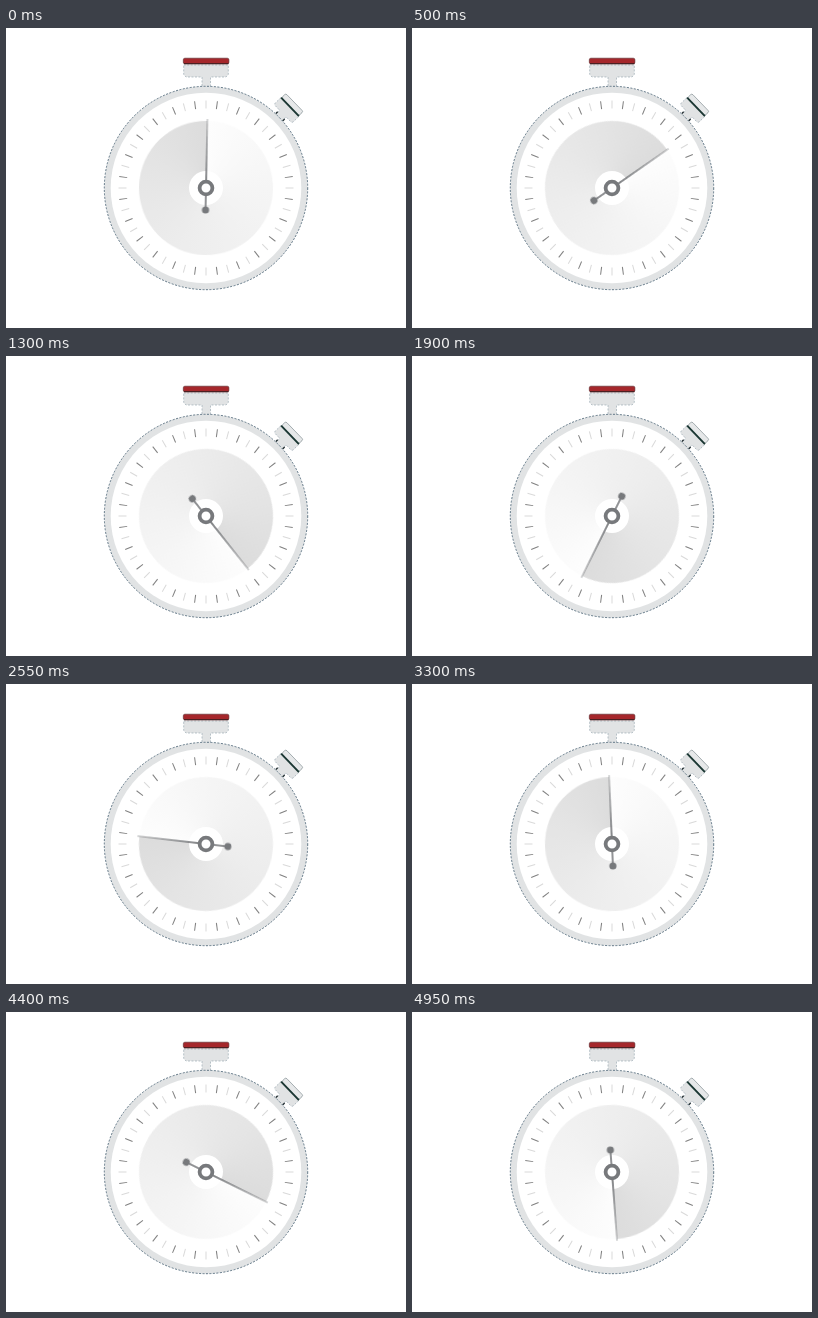
An HTML page that plays this animation: 400 px wide and 300 px high, repeating every 5 s.

```html
<!DOCTYPE html>
<html lang="en">
<head>
<meta charset="utf-8">
<title>Stopwatch</title>
<style>
  html, body { margin: 0; width: 100%; height: 100%; overflow: hidden; background: #fff; }
  svg, .sweep { position: absolute; }
  svg { left: 0; top: 0; }
  .sweep {
    left: 133px; top: 93px; width: 134px; height: 134px; border-radius: 50%;
    background: conic-gradient(#fdfdfd, #f5f5f5 25%, #ededed 55%, #e4e4e4 82%, #dcdcdc);
  }
  #hand { transform-origin: 0 0; }
</style>
</head>
<body>
<svg width="400" height="300" viewBox="0 0 400 300">
  <g fill="#e1e3e4" stroke="#8fa0aa" stroke-width=".6" stroke-dasharray="2 1.5">
    <path d="M177.7 37H222.3V46.5L220 49H204.5V60H196V49H180L177.7 46.5Z"/>
    <g transform="translate(200 160) rotate(46)">
      <path d="M-4.5 -101V-107H-11Q-13 -107 -13 -109V-116.5H13V-109Q13 -107 11 -107H4.5V-101Z"/>
    </g>
    <circle cx="200" cy="160" r="101.7" stroke="#3f5a6c" stroke-width=".8"/>
  </g>
  <rect x="177.3" y="30.2" width="45.6" height="5.6" rx="1.6" fill="#a5272b" stroke="#57272a" stroke-width=".6"/>
  <path d="M178 35.6H222.5" stroke="#4a2022" stroke-width="1.1"/>
  <g transform="translate(200 160) rotate(46)">
    <rect x="-12.5" y="-123" width="25" height="6" rx="1.6" fill="#e6e8e9" stroke="#5d6d72" stroke-width=".5"/>
    <path d="M-12.8 -116.8H12.8" stroke="#1b3733" stroke-width="1.9"/>
    <path d="M-5 -104.5V-102M5 -104.5V-102" stroke="#222d30" stroke-width="1.4"/>
  </g>
  <circle cx="200" cy="160" r="95.3" fill="#fff"/>
  <g id="ticks" transform="translate(200 160)"></g>
</svg>
<div class="sweep" id="sweep"></div>
<svg width="400" height="300" viewBox="0 0 400 300">
  <g transform="translate(200 160)">
    <circle r="17" fill="#fff"/>
    <g id="hand" fill="#77797c">
      <path d="M-.3 -69H.3L.9 -7H-.9Z"/>
      <path d="M-.8 7H.8V20H-.8Z"/>
      <circle cy="22" r="3.6"/>
    </g>
    <circle r="6.4" fill="#fff" stroke="#77797c" stroke-width="3.8"/>
  </g>
</svg>
<script>
  const byId = id => document.getElementById(id);

  // Faint and dark marks alternate around the dial.
  const marks = 48;
  for (let i = 0; i < marks; i++) {
    const tick = document.createElementNS("http://www.w3.org/2000/svg", "path");
    tick.setAttribute("d", "M0 -87.5V-79.5");
    tick.setAttribute("transform", `rotate(${i * 360 / marks})`);
    tick.setAttribute("stroke", i % 2 ? "#808080" : "#d9d9d9");
    byId("ticks").append(tick);
  }

  // One and a half turns per loop, in 100 discrete steps.
  const turn = [{ transform: "rotate(1.2deg)" }, { transform: "rotate(541.2deg)" }];
  const timing = { duration: 5000, iterations: Infinity, easing: "steps(100, end)" };
  for (const id of ["sweep", "hand"]) {
    byId(id).animate(turn, timing).startTime = 0;
  }
</script>
</body>
</html>
```
